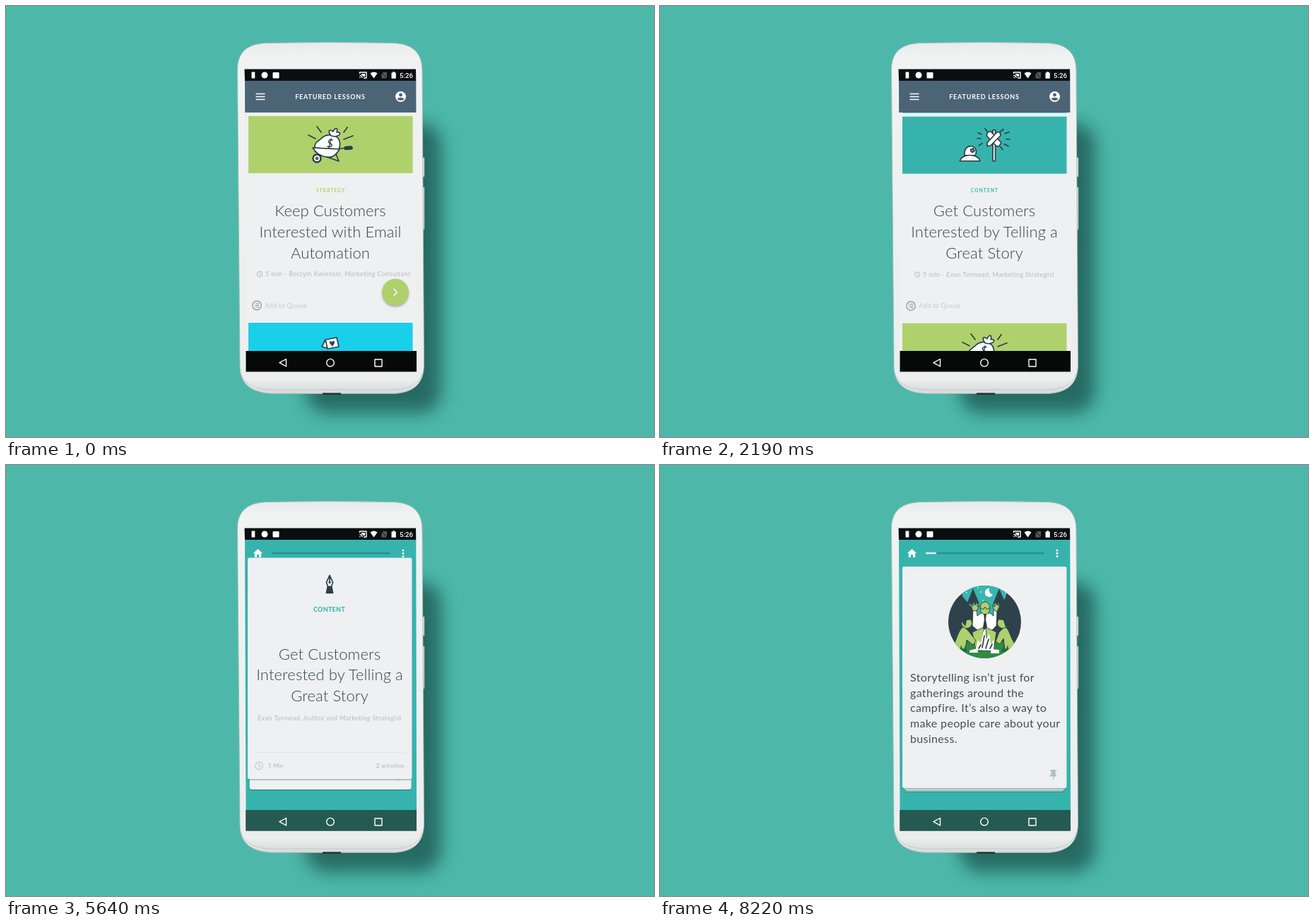
These frames come from a looping animation (917 by 611 pixels, 8880 ms). An HTML page:

```html
<!DOCTYPE html>
<html lang="en">
<head>
<meta charset="utf-8">
<title>Lessons app</title>
<style>
  html, body { margin: 0; width: 100%; height: 100%; overflow: hidden; background: #4db8aa; }
  svg { display: block; width: 100%; height: 100%; }
  text { font-family: Lato, sans-serif; fill: #33434e; }
  .mid { text-anchor: middle; }
  .title { font-size: 22px; font-weight: 300; letter-spacing: .1px; }
  .tag { font-size: 6.5px; font-weight: 700; letter-spacing: 1.2px; }
  .head { font-size: 9px; font-weight: 700; letter-spacing: .3px; }
  .bar { font-size: 9px; font-weight: 700; letter-spacing: .8px; fill: #fff; }
  .meta { font-size: 9px; font-weight: 400; letter-spacing: .4px; fill: #b6bac3; }
  .queue { font-size: 9px; letter-spacing: .3px; fill: #c6cace; }
  .small { font-size: 8px; letter-spacing: .2px; fill: #a9b1b7; }
  .body { font-size: 11px; letter-spacing: .27px; fill: #4a5761; }
  .big { font-size: 16px; letter-spacing: .35px; fill: #414f59; }
  .ink { fill: none; stroke: #2c3e48; stroke-width: 1.7; stroke-linecap: round; stroke-linejoin: round; }
  .white { fill: #fff; }
  .dark { fill: #2c3e48; }
  .line { fill: none; stroke: #fff; stroke-width: 1.4; stroke-linejoin: round; }
</style>
</head>
<body>
<svg viewBox="0 0 917 611" preserveAspectRatio="none">
  <defs>
    <filter id="soft" x="-30%" y="-30%" width="160%" height="160%"><feGaussianBlur stdDeviation="12"/></filter>
    <filter id="glow" x="-50%" y="-50%" width="200%" height="200%"><feGaussianBlur stdDeviation="1.5"/></filter>
    <linearGradient id="shell" x2="0" y2="1">
      <stop offset="0" stop-color="#e6eaea"/><stop offset=".04" stop-color="#f1f3f3"/>
      <stop offset=".96" stop-color="#eceeee"/><stop offset="1" stop-color="#d5d9d9"/>
    </linearGradient>
    <clipPath id="content"><path d="M338 106H580.3L581 489H339.5Z"/></clipPath>
    <clipPath id="scene"><circle cx="459.500" cy="222.500" r="51.500"/></clipPath>

    <g id="wheelbarrow" class="ink">
      <path d="M428 183L438 188M440 171L446 179M483 172L478 179M478 189L491 184"/>
      <path class="white" d="M437 201C436 192 444 191 447 187C452 182 460 182 465 184C473 187 474 196 471 203Z"/>
      <path class="white" d="M460 184C455 177 457 174 463 178C466 171 470 173 468 179C475 178 474 184 465 185Z"/>
      <path d="M462 190C457 188 454 193 459 195S460 201 455 199M460 188L457 201" stroke-width="1.400"/>
      <path class="white" d="M434 201L472 203C467 212 461 216 453 214C445 213 438 208 434 201Z"/>
      <path d="M472 202L490 201M467 210L471 220L454 214M446 212L440 216"/>
      <path d="M481 201.500L488 201" stroke-width="5.500"/>
      <circle class="white" cx="440" cy="216" r="5.500" stroke-width="2.400"/><circle cx="440" cy="216" r="1.500"/>
    </g>

    <g id="rose" class="ink">
      <path class="white" d="M452 180L468 177L471 190L455 193ZM452 180L447 190L455 192"/>
      <path class="dark" d="M462 189C456 184 458 181 461.500 183.500C464 180 467 183 462 189Z" stroke-width=".6"/>
      <path d="M450 206C463 203 472 206 486 202M469 205L473 201M477 203.500L481 206"/>
      <path class="white" d="M455 205C453 199 458 197 461 199C461 202 459 205 455 205ZM455 206C459 206 463 210 462 214C457 215 454 211 455 206Z"/>
      <path class="white" d="M433 205C432 199 438 196 442 198C447 196 451 201 449 206C451 211 445 216 441 214C436 217 431 211 433 205Z"/>
      <path d="M436 203C438 198 446 199 446 205S438 212 437 206S443 203 443 206M434 209C438 215 444 214 448 208" stroke-width="1.400"/>
    </g>

    <g id="signpost" class="ink">
      <path d="M450 179L455 181M449 187H454M451 197L456 194M460 173L463 177M482 177L486 174M488 180L494 178M490 188H495M487 195L493 198M482 199L485 203"/>
      <path class="white" d="M431 211C430 202 435 197 441 198C447 199 449 205 446 211ZM440 202C438 207 444 208 445 204"/>
      <circle class="dark" cx="443" cy="202" r="1"/>
      <path class="white" d="M424.500 219C427 208 450 208 453 219Z"/>
      <path class="white" d="M471 175H474.500V219H471Z"/>
      <path class="white" d="M464 178L468 177L483 193L480 198L476 198L462 183Z"/>
      <path class="white" d="M481 178L482 183L468 197L463 198L463 193L477 178Z"/>
    </g>

    <g id="nib" class="ink" stroke-width="1.500">
      <path class="white" d="M459 171L454.500 181L456.500 187H461.500L463.500 181Z"/>
      <path d="M459 172V181"/><circle class="dark" cx="459" cy="181" r=".8"/>
      <path class="dark" d="M456 188H462L463.500 196H454.500Z"/>
    </g>

    <path id="pin" fill="#b3bfc6" d="M552.500 432H560.500V434H559.500V438.500L561.500 440.500V441.500H557.200V446H556V441.500H551.500V440.500L553.500 438.500V434H552.500Z"/>

    <g id="campfire" clip-path="url(#scene)">
      <path fill="#2f424c" d="M400 165H520V280H400Z"/>
      <path fill="#3ab5ae" d="M426 165H493L489 188L478 200L459 238L441 202L428 186Z"/>
      <path fill="#2f424c" d="M443 175L452 197H434ZM480 175L489 197H471Z"/>
      <path class="white" d="M466 175A6 6 0 1 0 471 184A7 7 0 0 1 466 175Z"/>
      <g class="white"><circle cx="454" cy="180" r="1"/><circle cx="457" cy="192" r=".8"/><circle cx="434" cy="181" r=".8"/><circle cx="489" cy="182" r=".8"/><circle cx="450" cy="174" r=".7"/></g>
      <path fill="#318a45" d="M400 256Q459 244 520 256V280H400Z"/>
      <g fill="#aed06d" stroke="#2c3e48" stroke-width=".9" stroke-linejoin="round">
        <path class="white" d="M443 205L448 204L449 214L454 210H467L472 214L472 204L477 205L476 228L470 234L466 263H453L449 234L442 228Z"/>
        <path d="M442 206L440 196L443 200L444 192L446 199L449 193L449 201L452 199L448 207ZM473 206L470 198L474 201L474 193L477 199L479 192L479 200L482 197L477 208Z"/>
        <ellipse cx="460" cy="203" rx="7" ry="9"/>
        <path d="M442 237L458 230L455 263H447ZM476 237L461 230L463 263H472Z"/>
        <path d="M417 252C422 241 423 233 430 229L437 236L447 249L443 255L434 248L432 261H414ZM502 253C496 246 495 233 488 229L480 237L475 250L481 254L486 246L488 261H505Z"/>
        <circle cx="434" cy="224" r="7.500"/><circle cx="485" cy="224" r="7.500"/>
      </g>
      <path class="dark" d="M458 211H462L461 219L463 230L459 234L457 230L459 219ZM427 222C429 214 438 214 441 219L434 220L432 229ZM479 219C483 213 492 216 493 226L489 230L486 220Z"/>
      <path fill="none" stroke="#2c3e48" d="M454 202A2.500 2.500 0 1 0 459 202H461A2.500 2.500 0 1 0 466 202"/>
      <path class="white" d="M447 262L450 248L454 253L458 234L462 247L466 239L468 254L473 247L472 263Z"/>
      <path class="ink" stroke-width="1.300" d="M451 260L454 255M456 259L459 242M461 260L465 247M467 260L470 254"/>
      <path fill="#1f6c39" d="M424 264L426 255L429 263L432 256L435 265ZM483 265L486 256L489 263L492 255L494 265Z"/>
      <path class="white" d="M438 263L449 260L450 266H438ZM468 261L480 262V267H468Z"/>
    </g>
  </defs>

  <path fill="#4db8aa" d="M0 0H917V611H0Z"/>
  <rect x="424" y="166" width="192" height="411" rx="30" fill="#1d5a53" opacity=".82" filter="url(#soft)"/>
  <path fill="#dfe3e3" stroke="#8ca5a2" stroke-width=".7" d="M588 215H592V242H588ZM588 257H592V317H588Z"/>
  <path fill="url(#shell)" stroke="#a9b7b6" stroke-width=".9" d="M327.500 92C327 64 343 53 370 52.500Q459 50.500 546 52.500C574 53 589 65 589 92L591.500 508C591.500 536 576 548.500 548 549.500H376C347 548 331 536 331 510Z"/>
  <path fill="none" stroke="#c3cac9" d="M333 522C338 537 353 543 376 544H548C570 543 584 537 589 521"/>
  <path fill="#27302f" d="M448 548.500H474V551H448Z"/>

  <g clip-path="url(#content)">
    <g id="feed">
      <path fill="#eef0f1" d="M330 100H590V495H330Z"/>
      <g id="cards"></g>
      <path fill="#4b6476" d="M330 100H590V151H330Z"/>
      <path class="line" d="M353.500 124.500H366.500M353.500 128.500H366.500M353.500 132.500H366.500"/>
      <text class="bar mid" x="459" y="131.500">FEATURED LESSONS</text>
      <circle class="white" cx="558.500" cy="128.500" r="7.500"/>
      <g fill="#4b6476"><circle cx="558.500" cy="126" r="2.400"/><path d="M553.500 132C555 129 562 129 563.500 132Q559 136 553.500 132Z"/></g>
    </g>
    <circle id="reveal" cx="551" cy="406" fill="#37b3ad"/>
    <g id="lesson">
      <g id="lessonBar">
        <path class="white" d="M356.500 119L363 125H361.200V131H358V127H355V131H351.800V125H350Z"/>
        <path fill="#2b918d" d="M376 123.700H543V126.300H376Z"/>
        <rect id="progress" x="376" y="123.700" height="2.600" fill="#d8f0ef"/>
        <g class="white"><circle cx="562" cy="121" r="1.500"/><circle cx="562" cy="125.300" r="1.500"/><circle cx="562" cy="129.600" r="1.500"/></g>
      </g>
      <g id="decks"></g>
    </g>
  </g>

  <path fill="#0a0e10" d="M337.500 89.500H580L580.300 106H338Z"/>
  <path class="white" d="M347.500 93.500H352.300V102.500H347.500Z"/>
  <circle class="white" cx="366" cy="98" r="4.500"/>
  <rect class="white" x="377.500" y="94" width="9" height="8.500" rx="1"/>
  <path class="line" stroke-width="1" d="M500.500 96V94H510V102H506M500.500 98.500A3.500 3.500 0 0 1 504 102M500.500 101L501.500 102"/>
  <path class="white" d="M503 96H508V100H505.500Q505 98.500 503 98Z"/>
  <path class="white" d="M515.500 95.500Q520.500 91.500 525.500 95.500L520.500 102.500Z"/>
  <path fill="#555b5d" d="M534 94H539V102.500H531.500V96.500Z"/><path stroke="#0a0e10" d="M531 94L540 103"/>
  <path class="white" d="M545.500 94.500H547.300V93.300H550V94.500H551.800V102.700H545.500Z"/>
  <text x="557" y="101.500" style="font:500 9.600px Roboto,sans-serif;fill:#fff">5:26</text>

  <path fill="#070909" d="M339.500 489H581V518.500H339.500Z"/>
  <path id="navTint" fill="#255a53" d="M339.500 489H581V518.500H339.500Z"/>
  <path class="line" d="M396.500 500.500V511L387 505.700Z"/>
  <circle class="line" cx="459" cy="505.700" r="5.300"/>
  <path class="line" d="M522 501H532V511H522Z"/>
</svg>
<script>
const LOOP = 8880, STEP = 30, PITCH = 293, SWIPE = 364;
const $ = id => document.getElementById(id);
const ramp = (t, start, length) => Math.min(1, Math.max(0, (t - start) / length));
const outQuad = p => 1 - (1 - p) ** 2;
const outCubic = p => 1 - (1 - p) ** 3;
const inOut = p => p < .5 ? 2 * p * p : 1 - 2 * (1 - p) ** 2;

const text = (x, y, cls, s, style = '') => `<text x="${x}" y="${y}" class="${cls}" style="${style}">${s}</text>`;
const lines = (x, y, gap, cls, list) => list.map((s, i) => text(x, y + i * gap, cls, s)).join('');
const clock = (x, y, r) => `<g fill="none" stroke="#b6bac3"><circle cx="${x}" cy="${y}" r="${r}"/>
  <path d="M${x} ${y - r * .6}V${y}L${x + r * .5} ${y + r * .4}"/></g>`;

const lessons = [
  { color: '#afd16c', art: 'wheelbarrow', tag: 'STRATEGY', clockX: 359,
    title: ['Keep Customers', 'Interested with Email', 'Automation'],
    meta: '5 min - Borzym Kwietnar, Marketing Consultant' },
  { color: '#19cfea', art: 'rose', tag: 'ADVERTISING', clockX: 415,
    title: ['How Remarketing', 'Keeps Customers', 'Coming Back'], meta: '5 min - Lodrin Team' },
  { color: '#37b3ad', art: 'signpost', tag: 'CONTENT', clockX: 364,
    title: ['Get Customers', 'Interested by Telling a', 'Great Story'],
    meta: '5 min - Evan Tormead, Marketing Strategist' },
];
lessons.push({ ...lessons[0] });

const feedCard = c => `<g>
  <path fill="#eef0f1" d="M330 151H590V495H330Z"/>
  <path fill="${c.color}" d="M343 156H575.500V237H343Z"/><use href="#${c.art}"/>
  ${text(459.5, 263.5, 'tag mid', c.tag, 'fill:' + c.color)}
  ${lines(459, 297.7, 30, 'title mid', c.title)}
  ${clock(c.clockX, 380, 3.8)}${text(c.clockX + 8, 383.3, 'meta', c.meta)}
  <g fill="none" stroke="#8b95a5" stroke-width="1.200"><circle cx="355" cy="424.500" r="6.300"/>
    <path d="M353.500 422H358.500M353.500 424.500H358.500M353.500 427H358.500M351.500 422H352.500M351.500 424.500H352.500M351.500 427H352.500"/></g>
  ${text(366.5, 427.7, 'queue', 'Add to Queue')}
  <g class="fab"><circle cy="2" r="19" fill="#000" opacity=".28" filter="url(#glow)"/>
    <circle r="19" fill="${c.color}"/><path class="line" stroke-width="2.200" d="M-2.500 -5L2.500 0L-2.500 5"/></g></g>`;
$('cards').innerHTML = lessons.map(feedCard).join('');
const cards = [...$('cards').children];
const fabs = [...document.querySelectorAll('.fab')];

const sheet = (inset, drop) => `<rect x="${343 + inset}" y="${145.3 + drop}" width="${232.5 - 2 * inset}" height="314" rx="2.500" fill="#0b5a58" opacity=".45"/>
  <rect x="${343 + inset}" y="${144 + drop}" width="${232.5 - 2 * inset}" height="314" rx="2.500" fill="#eef0f1"/>`;
$('decks').innerHTML = `
  <g id="answers">${sheet(0, 0)}<use href="#nib"/><use href="#pin"/>
    ${text(459, 220.3, 'head mid', 'WE’LL ANSWER')}
    ${lines(353, 253, 16, 'body', ['How can I use my own experiences to', 'help my business?', '',
      'What’s the personal approach to', 'storytelling?', '', 'What’s the higher purpose approach?'])}</g>
  <g id="intro">${sheet(0, 0)}<use href="#nib" y="-2"/>
    ${text(458.5, 221, 'head mid', 'CONTENT', 'fill:#2fb0aa')}
    ${lines(459, 288.5, 29.3, 'title mid', lessons[2].title)}
    ${text(459, 374.3, 'meta mid', 'Evan Tormead, Author and Marketing Strategist')}
    <path stroke="#e2e6e8" d="M353 420H565"/>
    ${clock(359, 439, 5.3)}${text(372, 441.8, 'small', '5 Min')}
    ${text(565, 441.8, 'small', '2 activities', 'text-anchor:end')}</g>
  <g id="story">${sheet(4, 4.5)}${sheet(2, 2.2)}${sheet(0, 0)}<use href="#campfire"/><use href="#pin"/>
    ${lines(354, 307, 21.7, 'big', ['Storytelling isn’t just for', 'gatherings around the',
      'campfire. It’s also a way to', 'make people care about your', 'business.'])}</g>`;

const show = (el, on) => el.style.display = on ? '' : 'none';
const move = (el, x, y) => el.setAttribute('transform', `translate(${x} ${y})`);

function drawFeed(t) {
  const scroll = outCubic(ramp(t, 165, 885)) + outCubic(ramp(t, 1425, 885));
  const scales = [
    1 - ramp(t, 165, 36),
    outQuad(ramp(t, 1050, 180)) - ramp(t, 1425, 36),
    outQuad(ramp(t, 2310, 180)),
    0,
  ];
  cards.forEach((card, i) => {
    const offset = i - scroll;
    show(card, offset > -1 && offset < 1.3);
    move(card, 0, PITCH * offset * (offset < 0 ? .08 : 1));
    fabs[i].setAttribute('transform', `translate(551 405.700) scale(${Math.max(0, scales[i])})`);
  });
}

function drawLesson(t) {
  const enter = outQuad(ramp(t, 4080, 450));
  const first = ramp(t, 5610, 870), second = ramp(t, 6750, 450);
  const enterStory = outQuad(ramp(t, 7500, 720));
  $('lesson').setAttribute('opacity', enter);
  move($('lessonBar'), 0, 8 * (1 - enter));
  move($('decks'), 0, 20 * (1 - enter));

  move($('intro'), -Math.min(1, first * 30), -SWIPE * first);
  const depth = 1 - first;
  $('answers').setAttribute('transform',
    `translate(459 ${458 + 2 * depth - SWIPE * second}) scale(${1 - .0165 * depth}) translate(-459 -458)`);
  show($('answers'), second < 1);

  show($('story'), enterStory > 0);
  $('story').setAttribute('opacity', enterStory);
  move($('story'), 0, 40 * (1 - enterStory));
  $('progress').setAttribute('width', 15 * enterStory);
}

function draw() {
  const t = Math.floor(performance.now() % LOOP / STEP) * STEP;
  show($('feed'), t < 4080);
  show($('lesson'), t >= 4080);
  drawFeed(t);
  drawLesson(t);
  $('reveal').setAttribute('r', t < 3180 ? 0 : t < 4080 ? 19 + 350 * inOut(ramp(t, 3195, 885)) : 500);
  $('navTint').setAttribute('opacity', ramp(t, 3840, 360));
  requestAnimationFrame(draw);
}
draw();
</script>
</body>
</html>
```
